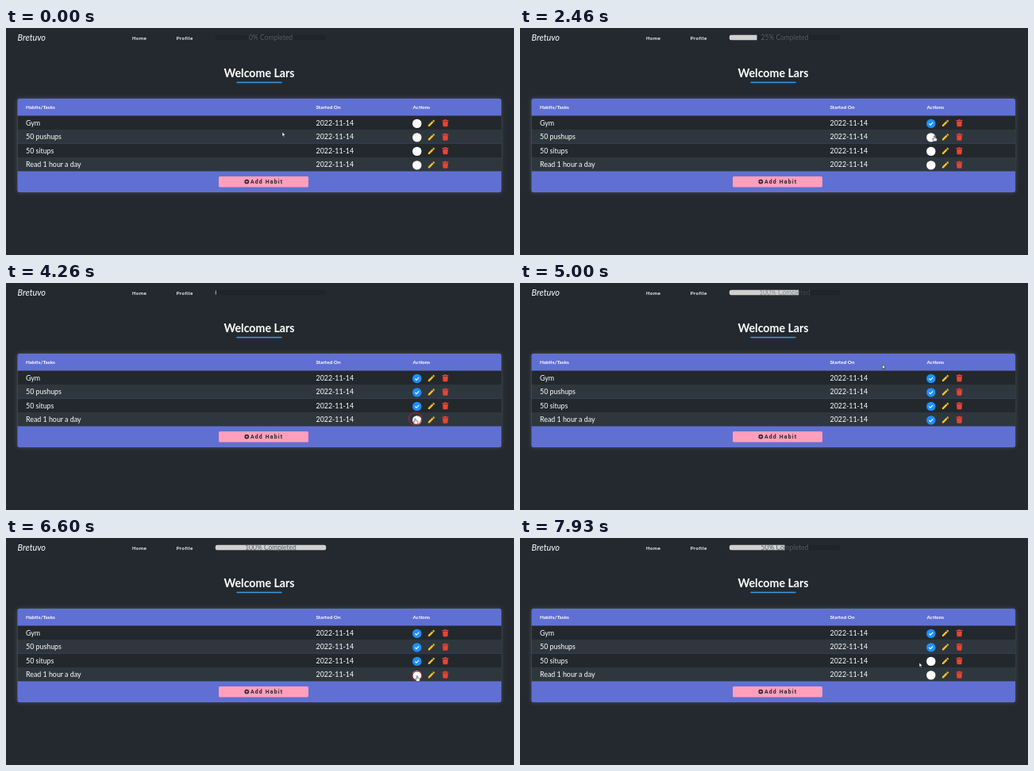
Write an HTML page that moves like this. It is 640 px wide and 286 px high and loops after 8000 ms.

```html
<!DOCTYPE html>
<html lang="en">
<head>
<meta charset="utf-8">
<title>Habit tracker</title>
<style>
html, body { margin: 0; width: 100%; height: 100%; overflow: hidden; background: #24292f; }
svg { display: block; width: 100%; height: 100%; font-family: Lato, sans-serif; fill: #fff; }
.nav { font: 500 6.2px Roboto, sans-serif; letter-spacing: .4px; }
.head { font-size: 6.4px; font-weight: 700; }
.cell { font-size: 8.85px; }
.button { font: 700 7px Roboto, sans-serif; letter-spacing: 1.1px; fill: #24282f; }
</style>
</head>
<body>
<svg viewBox="0 0 640 286">
  <defs>
    <filter id="glow" x="-5%" y="-10%" width="110%" height="120%">
      <feDropShadow dx="0" dy="0" stdDeviation="2.5" flood-color="#7a838c" flood-opacity=".45"/>
    </filter>
    <clipPath id="track"><rect x="263.5" y="8.5" width="140" height="7" rx="3.5"/></clipPath>
    <path id="pencil" transform="translate(-5.5 -5.5) scale(.46)" fill="#fbc41f"
      d="M3 17.25V21h3.75L17.8 9.94l-3.75-3.75zM20.7 7.04a1 1 0 0 0 0-1.41l-2.34-2.34a1 1 0 0 0-1.41 0l-1.83 1.83 3.75 3.75z"/>
    <path id="trash" fill="#ea4335"
      d="M-3.9-3.6h2.2l.6-.9h2.2l.6.9h2.2v1.1h-7.8zM-3.4-2h6.8L3 3.6q-.1.9-1 .9h-4q-.9 0-1-.9z"/>
  </defs>

  <text x="14.5" y="16.2" font-size="10.9" font-style="italic">Bretuvo</text>
  <text class="nav" x="159" y="14.7">Home</text>
  <text class="nav" x="214.7" y="14.7">Profile</text>

  <g clip-path="url(#track)">
    <rect x="263.5" y="8.5" width="140" height="7" fill="#20242a"/>
    <rect id="fill" x="263.5" y="8.5" height="7" fill="#d0d0d0"/>
  </g>
  <text id="label" x="333.5" y="15.2" font-size="8.5" text-anchor="middle" fill="#5b5e62"></text>

  <text x="319" y="62.3" font-size="14.2" font-weight="700" text-anchor="middle">Welcome Lars</text>
  <rect x="290.5" y="67.8" width="57" height="1.5" fill="#3c9be0"/>

  <rect x="14.5" y="89" width="609.5" height="118" rx="2.5" fill="#6070d2" filter="url(#glow)"/>
  <text class="head" x="25" y="102">Habits/Tasks</text>
  <text class="head" x="390.5" y="102">Started On</text>
  <text class="head" x="512.5" y="102">Actions</text>
  <g id="rows"></g>

  <rect x="268" y="187" width="113" height="13.5" rx="1.5" fill="#ff9fbc"/>
  <circle cx="303.3" cy="193.6" r="2.9" fill="#24282f"/>
  <path d="M301.7 193.6h3.2m-1.6-1.6v3.2" stroke="#ff9fbc" stroke-width=".8"/>
  <text class="button" x="308" y="196.2">Add Habit</text>

  <circle id="ring" fill="none" stroke="#c2202c" stroke-width="1"/>
  <g id="cursor" stroke="#111" stroke-width=".5" stroke-linejoin="round">
    <path id="arrow" d="M0 0V5.6L1.3 4.4 2.2 6.4 3.1 6 2.2 4.1H4z"/>
    <path id="hand" d="M-.7 0Q0-.8.7 0V2.3L3 2.9Q3.7 3.1 3.5 4L3 6.8H-.5L-2.5 4.2Q-2.6 3.2-1.6 3.6L-.7 4.3z"/>
  </g>
</svg>
<script>
const LOOP = 8000, TOGGLE_DELAY = 200, BAR_DELAY = 540, BAR_TIME = 600, RING_TIME = 300;
const habits = ['Gym', '50 pushups', '50 situps', 'Read 1 hour a day'];

// Press time and row of each click; a second click unchecks the row.
const clicks = [[1160, 0], [2800, 1], [3700, 2], [4110, 3], [6350, 3], [6760, 2]];

// Time, x, y of the pointer tip.
const pointer = [
  [0, 348, 131], [350, 348, 131], [1050, 516.5, 122], [1450, 516.5, 122], [2200, 520, 133],
  [2460, 522, 136], [2750, 518, 139], [3050, 518, 139], [3600, 517, 156], [3880, 517, 156],
  [4080, 515.5, 171], [4650, 515.5, 171], [5350, 398, 35], [5850, 398, 35], [6300, 518, 174],
  [6600, 518, 174], [6740, 517, 156], [7250, 517, 156], [7700, 503, 157], [8000, 503, 157]
];

const $ = id => document.getElementById(id);
const clamp = v => Math.max(0, Math.min(1, v));
const smooth = v => v * v * (3 - 2 * v);

$('rows').innerHTML = habits.map((name, i) => {
  const top = 110.5 + i * 17.5, mid = top + 9.9;
  return `<rect x="14.5" y="${top}" width="609.5" height="17.5" fill="${i % 2 ? '#2e373e' : '#23282d'}"/>
    <text class="cell" x="25" y="${top + 12.1}">${name}</text>
    <text class="cell" x="390.5" y="${top + 12.1}">2022-11-14</text>
    <circle class="check" cx="517.8" cy="${mid}" r="5.7"/>
    <path d="M515.5 ${mid + .1}l1.6 1.6 3.1-3.2" fill="none" stroke="#fff" stroke-width="1.1"/>
    <use href="#pencil" x="536" y="${mid - .6}"/>
    <use href="#trash" x="553.5" y="${mid - .7}"/>`;
}).join('');
const checks = [...document.querySelectorAll('.check')];

function checkedAt(time) {
  const done = habits.map(() => false);
  for (const [start, row] of clicks) if (time >= start + TOGGLE_DELAY) done[row] = !done[row];
  return done;
}

function drawBar(time) {
  const last = clicks.filter(([start]) => time >= start + BAR_DELAY).pop();
  const since = last ? time - last[0] - BAR_DELAY : BAR_TIME;
  const count = last ? checkedAt(last[0] + TOGGLE_DELAY).filter(Boolean).length : 0;
  const progress = smooth(clamp(since / BAR_TIME));
  $('fill').setAttribute('width', 35 * count * progress + (count && since < 60 ? .8 : 0));
  $('label').textContent = `${count * 25}% Completed`;
  $('label').setAttribute('opacity', progress);
}

function drawPointer(time) {
  const k = pointer.findIndex(p => p[0] > time);
  const [t0, x0, y0] = pointer[k - 1], [t1, x1, y1] = pointer[k];
  const p = smooth((time - t0) / (t1 - t0));
  const x = x0 + (x1 - x0) * p, y = y0 + (y1 - y0) * p;
  const overButton = checks.some(c => Math.hypot(x - 517.8, y - c.getAttribute('cy')) < 6.5);
  $('cursor').setAttribute('transform', `translate(${x} ${y})`);
  $('hand').setAttribute('visibility', overButton ? 'visible' : 'hidden');
  $('arrow').setAttribute('visibility', overButton ? 'hidden' : 'visible');

  const press = clicks.find(([start]) => time >= start && time < start + RING_TIME);
  $('ring').setAttribute('cx', x);
  $('ring').setAttribute('cy', y);
  $('ring').setAttribute('r', press ? 11 - 6 * (time - press[0]) / RING_TIME : 0);
}

function frame() {
  const time = performance.now() % LOOP;
  const done = checkedAt(time);
  checks.forEach((c, i) => c.setAttribute('fill', done[i] ? '#1e90ff' : '#fff'));
  drawBar(time);
  drawPointer(time);
  requestAnimationFrame(frame);
}
frame();
</script>
</body>
</html>
```
